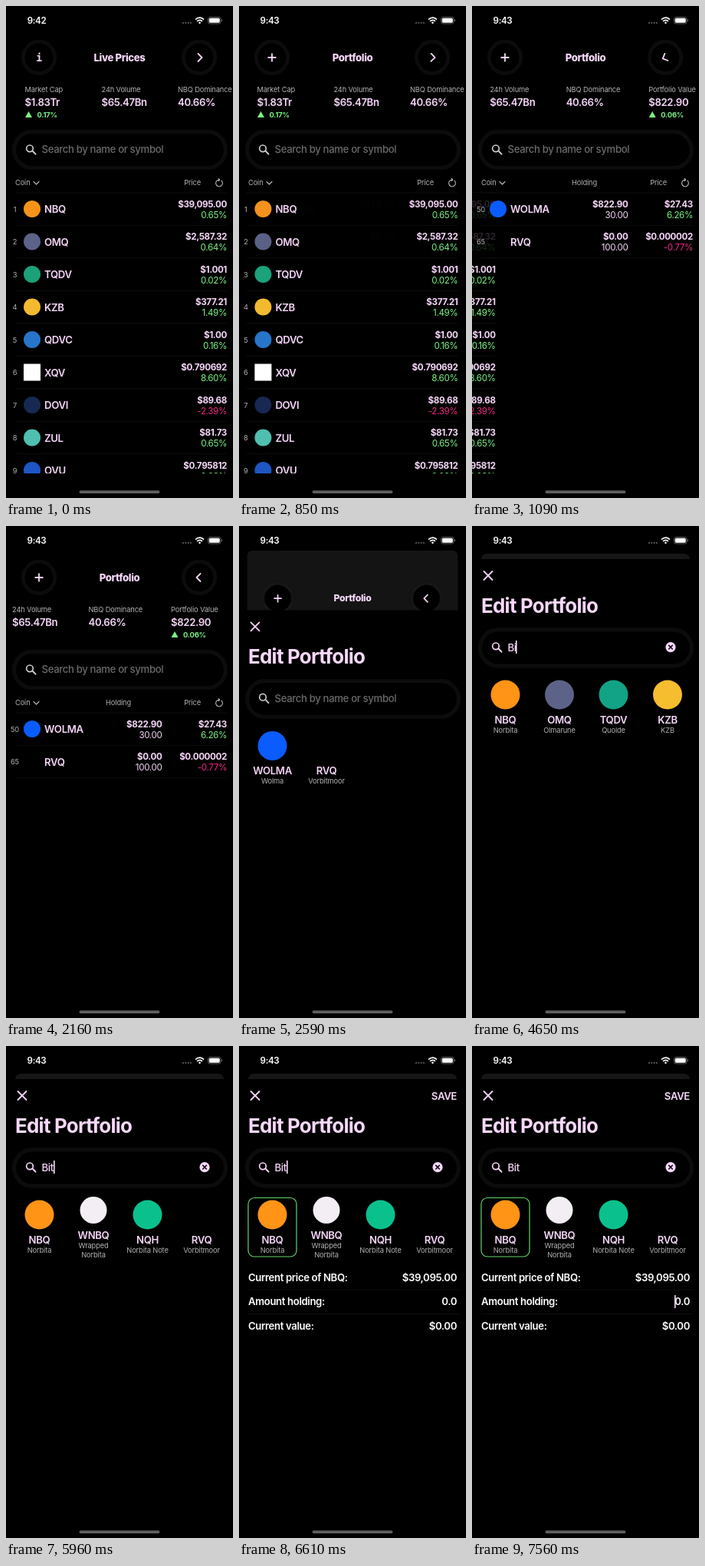
Write an HTML page that moves like this. It is 296 px wide and 640 px high and loops after 8000 ms.

```html
<!DOCTYPE html>
<html lang="en">
<head>
<meta charset="utf-8">
<title>Live Prices</title>
<style>
  html, body { margin: 0; width: 100%; height: 100%; overflow: hidden; background: #000; }
  svg { display: block; width: 100vw; height: 100vh; }
  text { font-family: Inter, Roboto, sans-serif; font-size: 13.2px; letter-spacing: -.028em; fill: #f8d7fb; white-space: pre; }
  .small { font-size: 9.3px; letter-spacing: -.015em; fill: #b5b0b5; }
  .sub { font-size: 11.6px; letter-spacing: -.03em; }
  .medium { font-weight: 500; }
  .semi { font-weight: 600; }
  .bold { font-weight: 700; }
  .heavy { font-weight: 800; }
  .end { text-anchor: end; }
  .mid { text-anchor: middle; }
  .up { fill: #7cf586; }
  .down { fill: #f02a83; }
  .white { fill: #fff; }
  .hint { fill: #6c6a6c; font-weight: 500; }
  .line { fill: none; stroke: #f8d7fb; stroke-width: 1.8; stroke-linecap: round; stroke-linejoin: round; }
  .grey { stroke: #bdb8bd; stroke-width: 1.1; }
  .rule { stroke: #121212; stroke-width: .8; }
  .halo { fill: #000; stroke: #191919; stroke-width: 4; filter: url(#blur); }
</style>
</head>
<body>
<svg id="stage" viewBox="0 0 296 640"></svg>
<script>
const ACCENT = '#f8d7fb';
const LOOP = 8000;
// Moments at which the picture advances.
const STEPS = [0, 850, 980, 1090, 1190, 1300, 1400, 1510, 1610,
  2480, 2590, 2700, 2810, 2920, 3670, 4420, 4650, 4910,
  5960, 6070, 6180, 6290, 6400, 6960, 7070, 7330, 7560];

const text = (x, y, s, cls = '', id = '') => `<text x="${x}" y="${y}" class="${cls}" id="${id}">${s}</text>`;
const group = (id, body, attrs = '') => `<g id="${id}" ${attrs}>${body}</g>`;
const path = (d, cls = 'line') => `<path d="${d}" class="${cls}"/>`;
const rule = y => path(`M12 ${y}H288`, 'rule');
const badge = (x, y, r, color, square) => !color ? '' : square
  ? `<rect x="${x - r}" y="${y - r}" width="${2 * r}" height="${2 * r}" fill="${color}"/>`
  : `<circle cx="${x}" cy="${y}" r="${r}" fill="${color}"/>`;
const trend = s => s[0] === '-' ? 'down' : 'up';

const roundButton = x =>
  `<circle cx="${x}" cy="67" r="20" class="halo"/><circle cx="${x}" cy="67" r="18.5"/>`;

const searchBar = y =>
  `<rect x="11" y="${y - 23}" width="275" height="46" rx="23" class="halo"/>
   <rect x="13" y="${y - 21}" width="271" height="42" rx="21"/>`;

const magnifier = (y, color) =>
  `<path d="M35 ${y + 2}L38.5 ${y + 5.7}" stroke="${color}" stroke-width="1.9" stroke-linecap="round"/>
   <circle cx="31" cy="${y - 1.7}" r="4.3" fill="none" stroke="${color}" stroke-width="1.7"/>`;

function stat(x, label, value, change) {
  return text(x, 112, label, 'small') + text(x, 130, value, 'semi') +
    (change ? `<path d="M${x + .5} 145L${x + 5} 137L${x + 9.5} 145Z" class="up"/>` +
      text(x + 16, 144.5, change, 'small bold up') : '');
}

function row(i, rank, symbol, price, change, color, square, held) {
  const y = 264 + 42.5 * i;
  return text(11.5, y + 3.5, rank, 'small mid') +
    badge(34, y, 11, color, square) +
    text(50, y + 5, symbol, 'semi') +
    (held ? text(203.5, y - 2.5, held[0], 'sub bold end') + text(203.5, y + 11.5, held[1], 'sub end') : '') +
    text(288, y - 2.5, price, 'sub bold end') +
    text(288, y + 11.5, change, 'sub end ' + trend(change)) +
    rule(y + 21.3);
}

function coin(col, symbol, names, color) {
  const x = 43.5 + 70.5 * col, lift = names.length > 1 ? 6 : 0;
  return badge(x, 219.5 - lift, lift ? 17.5 : 19, color) +
    text(x, 257 - lift, symbol, 'semi mid') +
    names.map((n, i) => text(x, 268.7 - lift + 12 * i, n, 'small mid')).join('');
}

const MARKET = [
  ['NBQ', '$39,095.00', '0.65%', '#f7931a'],
  ['OMQ', '$2,587.32', '0.64%', '#5d6388'],
  ['TQDV', '$1.001', '0.02%', '#1ba27a'],
  ['KZB', '$377.21', '1.49%', '#f3ba2f'],
  ['QDVC', '$1.00', '0.16%', '#2775ca'],
  ['XQV', '$0.790692', '8.60%', '#ffffff', true],
  ['DOVI', '$89.68', '-2.39%', '#172852'],
  ['ZUL', '$81.73', '0.65%', '#4fbfb0'],
  ['OVU', '$0.795812', '0.08%', '#1e56c5'],
];
const BLUE = '#0a5cff', ORANGE = '#ff9416';

const statusBar =
  text(40, 23, '9:42', 'sub semi mid white', 'clock') +
  [231, 234.3, 237.6, 240.9].map(x => `<circle cx="${x}" cy="22" r="1" fill="#666"/>`).join('') +
  `<g fill="none" stroke="#fff" stroke-width="1.7">
     <path d="M247 17.6Q252.5 12.8 258 17.6"/><path d="M249 19.9Q252.5 17 256 19.9"/></g>
   <circle cx="252.5" cy="21.8" r="1.3" fill="#fff"/>
   <rect x="263.5" y="14.5" width="16.5" height="8.5" rx="2.5" fill="none" stroke="#777" stroke-width=".8"/>
   <rect x="264.8" y="15.8" width="13.9" height="5.9" rx="1.5" fill="#fff"/>
   <path d="M281.3 17.5v2.5" stroke="#777"/>`;

const home =
  `<rect id="card" width="296" height="640"/>` +
  roundButton(43) + roundButton(252) +
  `<text id="info" x="43" y="71.5" class="mid bold" style="font-family:'DejaVu Sans Mono',monospace">i</text>` +
  group('plus', path('M38.2 67h9.6M43 62.2v9.6')) +
  group('arrow', path('M250.5 62l5 5l-5 5')) +
  text(148, 71.5, 'Live Prices', 'heavy mid', 'title') +
  group('stats',
    stat(24.5, 'Market Cap', '$1.83Tr', '0.17%') +
    stat(124.5, '24h Volume', '$65.47Bn') +
    stat(224, 'NBQ Dominance', '40.66%') +
    stat(331.5, 'Portfolio Value', '$822.90', '0.06%')) +
  searchBar(187) + magnifier(187, '#cfcacf') +
  text(46.5, 191.3, 'Search by name or symbol', 'hint') +
  text(12, 233, 'Coin', 'small') + path('M36 228.5l3.5 3.5l3.5-3.5', 'line grey') +
  text(163, 233, 'Holding', 'small end', 'holding') +
  text(254, 233, 'Price', 'small end') +
  path('M281 227.2a4.4 4.4 0 1 1-2.8-1.2M277 224.3l1.6 1.7l-1.6 1.7', 'line grey') +
  group('lists',
    group('market', rule(243) + MARKET.map((m, i) => row(i, i + 1, ...m)).join('')) +
    group('holdings', '<rect y="243" width="296" height="85" fill-opacity=".83"/>' + rule(243) +
      row(0, 50, 'WOLMA', '$27.43', '6.26%', BLUE, false, ['$822.90', '30.00']) +
      row(1, 65, 'RVQ', '$0.000002', '-0.77%', '', false, ['$0.00', '100.00'])),
    'clip-path="url(#listArea)"');

const sheet =
  '<rect y="43" width="296" height="640" rx="8"/>' +
  path('M15.5 59l11 11M26.5 59l-11 11') +
  '<text x="12" y="113" class="bold" style="font-size:26px;letter-spacing:-.03em">Edit Portfolio</text>' +
  searchBar(158.5) +
  group('idle', magnifier(158, '#cfcacf') + text(46.5, 162.8, 'Search by name or symbol', 'hint')) +
  group('active', magnifier(158, ACCENT) + text(46.5, 162.8, '', 'medium', 'query') +
    `<circle cx="259" cy="157.7" r="6.6" fill="${ACCENT}"/>
     <path d="M256.7 155.4l4.6 4.6M261.3 155.4l-4.6 4.6" stroke="#000" stroke-width="1.5" stroke-linecap="round"/>`) +
  `<rect id="caret" y="149" width="1.6" height="17" fill="${ACCENT}"/>` +
  group('owned', coin(0, 'WOLMA', ['Wolma'], BLUE) + coin(1, 'RVQ', ['Vorbitmoor'])) +
  group('all', coin(0, 'NBQ', ['Norbita'], ORANGE) + coin(1, 'OMQ', ['Olmarune'], '#5d6388') +
    coin(2, 'TQDV', ['Quolde'], '#12a386') + coin(3, 'KZB', ['KZB'], '#f6bd2e')) +
  group('found', coin(0, 'NBQ', ['Norbita'], ORANGE) + coin(1, 'WNBQ', ['Wrapped', 'Norbita'], '#f2eef4') +
    coin(2, 'NQH', ['Norbita Note'], '#0ac18e') + coin(3, 'RVQ', ['Vorbitmoor'])) +
  group('detail',
    '<rect x="12" y="197.5" width="63" height="76.5" rx="8" fill="none" stroke="#63d66b" stroke-width="1.2"/>' +
    text(284, 69.5, 'SAVE', 'semi end') +
    [['Current price of NBQ:', '$39,095.00'], ['Amount holding:', '0.0'], ['Current value:', '$0.00']]
      .map(([label, value], i) => text(12, 305.7 + 31.5 * i, label, 'semi white') +
        text(284, 305.7 + 31.5 * i, value, 'semi end white')).join('') +
    rule(317) + rule(348.5)) +
  `<rect id="amountCaret" x="264" y="324" width="1.6" height="17" fill="${ACCENT}"/>`;

const stage = document.getElementById('stage');
stage.innerHTML =
  `<defs><filter id="blur" x="-20%" y="-40%" width="140%" height="180%"><feGaussianBlur stdDeviation="2"/></filter>
   <clipPath id="listArea"><rect y="242" width="296" height="366"/></clipPath></defs>` +
  group('home', home) + group('sheet', sheet) + group('status', statusBar) +
  '<rect x="95.5" y="630.2" width="105" height="3.8" rx="1.9" fill="#5e5e5e"/>';

const el = {};
for (const node of stage.querySelectorAll('[id]')) el[node.id] = node;

const set = (id, name, value) => el[id].setAttribute(name, value);
const fade = (id, value) => set(id, 'opacity', +value);
const write = (id, value) => { el[id].textContent = value; };
const clamp = v => Math.min(1, Math.max(0, v));

// Lightly underdamped spring from 0 to 1; s in seconds.
function spring(s) {
  if (s <= 0) return 0;
  const w = 11.42, z = .825, d = w * Math.sqrt(1 - z * z);
  return 1 - Math.exp(-z * w * s) * (Math.cos(d * s) + z * w / d * Math.sin(d * s));
}

function render(t) {
  const swapped = t >= 850;
  const p = t >= 1610 ? 1 : spring((t - 838) / 1000);
  write('clock', swapped ? '9:43' : '9:42');
  write('title', swapped ? 'Portfolio' : 'Live Prices');
  fade('info', !swapped);
  fade('plus', swapped);
  set('arrow', 'transform', `rotate(${180 * p} 252 67)`);
  set('stats', 'transform', `translate(${-116.5 * p})`);
  set('market', 'transform', `translate(${-296 * p})`);
  fade('market', p < 1);
  fade('holdings', clamp(1.15 * p));
  fade('holding', clamp(1.15 * p));

  const open = t >= 2480;
  const drop = !open ? 600 : t >= 3670 ? 0 : 214 * Math.exp((2480 - t) / 94);
  const q = 1 - drop / 600, grey = Math.round(22 * q);
  set('home', 'transform', `translate(${12 * q} ${36 * q}) scale(${1 - q * 24 / 296})`);
  set('card', 'fill', `rgb(${grey},${grey},${grey})`);
  set('card', 'rx', 8 * q);
  set('sheet', 'transform', `translate(0 ${drop})`);
  fade('sheet', open);

  const typing = t >= 4420;
  const query = t < 4650 ? 'B' : t < 4910 ? 'Bi' : 'Bit';
  write('query', query);
  fade('idle', !typing);
  fade('active', typing);
  fade('owned', !typing);
  fade('all', typing && t < 5960);
  fade('found', t >= 5960);

  const blink = t < 6960 ? 1 : t < 7070 ? .5 : t < 7330 ? 0 : 1;
  set('caret', 'x', { B: 54.5, Bi: 57, Bit: 62 }[query]);
  fade('caret', typing && t < 7560 ? blink : 0);
  fade('amountCaret', t >= 7560);
  fade('detail', t < 6070 ? 0 : clamp((t - 5980) / 420) ** 1.6);
}

let shown = -1;
function tick() {
  const now = performance.now() % LOOP;
  const t = STEPS.filter(s => s <= now).pop();
  if (t !== shown) render(shown = t);
  requestAnimationFrame(tick);
}
tick();
</script>
</body>
</html>
```
